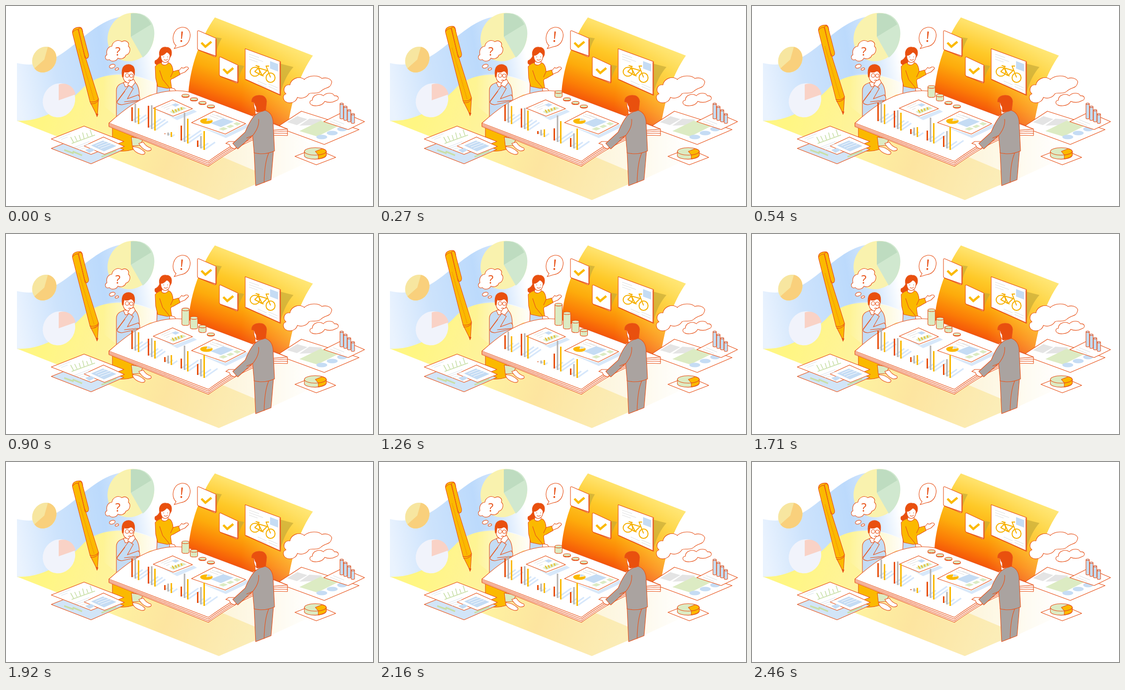
Recreate the animation shown at these times as an HTML page. Size 738 by 403 pixels, loop 2520 ms.

```html
<!DOCTYPE html>
<html lang="en">
<head>
<meta charset="utf-8">
<title>Open book workshop</title>
<style>
html, body { margin: 0; width: 100%; height: 100%; overflow: hidden; background: #fff; }
svg { display: block; width: 738px; height: 403px; }
.l { stroke: #e8531a; stroke-width: 1.1; stroke-linejoin: round; stroke-linecap: round; }
.n { fill: none; }
.w { fill: #fff; }
.y { fill: #fbb900; }
.b { fill: #c5dcf4; }
.g { fill: #dcebc3; }
.r { fill: #e9500e; }
.s { fill: #aaa3a0; }
.e { fill: #e4e4e4; }
.mark { fill: #e8531a; font: 500 24px "Noto Sans", "Open Sans", sans-serif; text-anchor: middle; }
</style>
</head>
<body>
<svg viewBox="0 0 738 403" xmlns="http://www.w3.org/2000/svg">
<defs>
  <linearGradient id="sky" gradientUnits="userSpaceOnUse" x1="22" y1="170" x2="300" y2="120">
    <stop offset="0" stop-color="#eaf3fe"/><stop offset=".3" stop-color="#cde3fc"/>
    <stop offset=".65" stop-color="#bcdafc"/><stop offset=".8" stop-color="#cfe4fd"/>
    <stop offset="1" stop-color="#fff"/>
  </linearGradient>
  <linearGradient id="floor" gradientUnits="userSpaceOnUse" x1="90" y1="190" x2="500" y2="340">
    <stop offset="0" stop-color="#fff683"/><stop offset=".35" stop-color="#fef2a0"/>
    <stop offset=".6" stop-color="#fde5a0"/><stop offset="1" stop-color="#fbedb8"/>
  </linearGradient>
  <linearGradient id="haze" gradientUnits="userSpaceOnUse" x1="440" y1="0" x2="625" y2="0">
    <stop offset="0" stop-color="#fdf5dc"/><stop offset="1" stop-color="#fff"/>
  </linearGradient>
  <linearGradient id="mist" gradientUnits="userSpaceOnUse" x1="195" y1="0" x2="310" y2="0">
    <stop offset="0" stop-color="#fff" stop-opacity="0"/><stop offset="1" stop-color="#fff"/>
  </linearGradient>
  <linearGradient id="page" gradientUnits="userSpaceOnUse" x1="463" y1="212" x2="516" y2="62">
    <stop offset="0" stop-color="#f4520a"/><stop offset=".18" stop-color="#fb7d06"/>
    <stop offset=".42" stop-color="#fdac0c"/><stop offset=".7" stop-color="#fec928"/>
    <stop offset="1" stop-color="#ffe26a"/>
  </linearGradient>
  <linearGradient id="glow" gradientUnits="userSpaceOnUse" x1="480" y1="100" x2="610" y2="110">
    <stop offset="0" stop-color="#fff08c" stop-opacity="0"/><stop offset="1" stop-color="#fff08c" stop-opacity=".4"/>
  </linearGradient>
</defs>

<!-- backdrop -->
<path fill="url(#sky)" d="M22 115C80 128 115 95 150 67C190 34 215 20 250 20C275 20 292 32 304 52V190H140L80 236L22 232Z"/>
<path fill="url(#floor)" d="M22 231C80 234 122 198 152 168C185 130 255 130 310 160L545 250L540 343L428 391Z"/>
<path fill="url(#mist)" d="M195 139C235 132 275 140 310 160H370L330 180L290 178L222 222L195 200Z"/>
<path fill="url(#haze)" d="M408 290L566 245L640 300L537 347L430 302Z"/>
<g transform="translate(77 108) rotate(32)">
  <ellipse rx="23.5" ry="27" fill="#f7e6a0"/>
  <path fill="#f9d07c" d="M0 0L-7.500 -25.600A23.5 27 0 1 1 -7.500 25.600Z"/>
</g>
<ellipse cx="106.500" cy="190" rx="32" ry="35" transform="rotate(28 106.500 190)" fill="#f1f3fb"/>
<path fill="#f9d2c6" d="M106 190V158C121 153 136 161 140 178Z"/>
<g>
  <ellipse cx="251" cy="62.500" rx="45.500" ry="50" transform="rotate(32 251 62.500)" fill="#f9f2ae"/>
  <path fill="#d0e8cf" d="M251 62V15C282 10 301 33 298 60C296 80 287 95 275 104Z"/>
  <path fill="#bedcc0" d="M251 62V15C271 13 285 22 292 37Z"/>
</g>

<!-- pen -->
<g id="pen" class="l">
  <path class="y" d="M169 193L182 219L184 219L186 187Z"/>
  <path class="r" d="M181 217L183 223L185 218Z"/>
  <path class="y" d="M134 56C132 47 139 42 150 43Q153 44 154 50L160 104L186 187Q182 195 169 193Z"/>
  <path class="y" d="M145 47Q150 41 153 48L166 98Q167 105 161 106L158 99Z"/>
  <path class="n" d="M134 53Q140 46 146 48L159 105M170 197Q181 198 186 190"/>
  <path class="n" stroke-dasharray=".3 2.800" d="M147 87L177 189"/>
</g>

<!-- seated thinker -->
<g class="l">
  <path class="y" d="M214 240V289Q234 296 256 289V262Z"/>
  <path class="g" d="M252 264L276 268L269 281L254 282Z"/>
  <path class="w" d="M254 284Q266 282 279 294Q281 300 272 299Q257 295 254 284ZM267 277L276 274Q281 283 291 286Q295 292 284 292Q274 289 267 277Z"/>
  <path class="b" d="M222 228V170Q222 159 235 155L258 153Q267 158 268 178L269 228Z"/>
  <path class="w" d="M236 154L240 163L252 160L250 151Z"/>
  <path class="w" d="M234 134L235 143Q238 155 247 155Q257 151 258 136L254 127L239 128Z"/>
  <path class="r" d="M234 143Q231 125 239 120Q248 115 256 122Q260 128 258 139Q256 132 251 131Q242 136 238 132Q236 137 236 143Z"/>
  <path class="w" d="M245 158L249 151L257 148L260 154L254 162L247 167Z"/>
  <path class="b" d="M247 160L256 166L244 187L266 179Q271 184 268 191L233 199Q221 198 224 191Z"/>
  <path class="n" d="M224 192L239 172M238 193L267 190"/>
  <g class="n"><circle cx="243.500" cy="140" r="3.700" class="w"/><circle cx="252" cy="140.500" r="3.500" class="w"/><path d="M246 150Q249 148 251 150"/></g>
</g>
<g class="l w">
  <path d="M203 98C201 89 205 82 213 81C214 72 225 66 233 72C241 67 249 74 246 81C252 86 249 97 241 99C239 106 230 108 225 105C222 112 212 113 208 108C200 111 197 102 203 98Z"/>
  <ellipse cx="213.500" cy="121.500" rx="6" ry="3.700" transform="rotate(-18 213 121)"/>
  <ellipse cx="223" cy="127" rx="3.700" ry="2" transform="rotate(-18 223 127)"/>
</g>
<text class="mark" x="225" y="100">?</text>

<!-- standing woman -->
<g class="l">
  <path class="r" d="M309 101C306 88 314 82 322 83C331 83 335 91 332 100L322 116Q311 113 305 119Q297 117 300 110Q306 108 309 101Z"/>
  <path class="w" d="M304 158L330 160L342 180L304 182Z"/>
  <path class="b" d="M304 157L331 161L333 178L303 182Z"/>
  <path class="w" d="M347 131L353 124Q357 127 361 123Q367 122 367 126L360 133L348 138Z"/>
  <path class="w" d="M329 164L339 167L342 172L329 174Z"/>
  <path class="y" d="M300 122Q306 114 316 114L329 115Q335 119 336 132L347 129L350 138L336 146Q331 147 331 151L333 165L324 166L305 162L301 145Z"/>
  <path class="w" d="M313 112V117Q320 122 326 115V111Z"/>
  <path class="w" d="M311 100Q312 113 320 114Q329 113 330 100Q328 94 323 93Q317 100 311 100Z"/>
  <path class="n" d="M318 108Q322 111 325 107M309 130L315 148L328 164M336 132L331 143"/>
  <path d="M317 102V103M325 102V103"/>
</g>
<path class="l w" d="M342 80C331 70 335 47 352 43C368 41 373 55 369 67C366 77 359 81 351 82L338 86Z"/>
<text class="mark" x="353" y="72" transform="rotate(5 353 64)" style="font-size:29px">!</text>

<!-- raised page -->
<g>
  <path fill="url(#page)" d="M420 23L617 100C591 137 575 185 566 248L367 173C371 120 391 64 420 23Z"/>
  <path fill="url(#glow)" d="M420 23L617 100C591 137 575 185 566 248L367 173C371 120 391 64 420 23Z"/>
  <g fill="#c5a938" opacity=".65">
    <path d="M421 63L434 65Q426 78 423 94ZM466 118L479 121Q471 133 467 149ZM551 116L578 123Q561 142 552 175Z"/>
  </g>
  <g class="l w">
    <path d="M388 50L420 64Q423 65 423 68V99Q423 103 419 102L388 89Q385 88 385 85V52Q385 49 388 50Z"/>
    <path d="M432 103L464 118Q467 119 467 122V152Q467 156 463 155L432 142Q429 141 429 138V105Q429 102 432 103Z"/>
    <path d="M481 86L552 112V180L481 148Z"/>
    <path class="n" stroke-width="1.600" d="M422 67V101L388 89M466 121V154L432 142M551 113V179L482 148"/>
  </g>
  <g fill="none" stroke="#fbb900" stroke-width="4.500"><path d="M393 74L401 82L413 72M437 127L445 135L457 125"/></g>
  <path class="b" d="M531 111L547 117V132L531 126Z"/>
  <g stroke="#dedede" fill="none"><path d="M489 97L509 104M489 102L517 112M489 107L506 113M506 151L524 159M528 157L546 165M506 156L524 164M528 162L546 170"/></g>
  <g fill="none" stroke="#f6b000" stroke-width="2" stroke-linejoin="round">
    <ellipse cx="500.500" cy="132.500" rx="9.500" ry="9"/>
    <ellipse cx="532" cy="144.500" rx="9" ry="9.500"/>
    <path d="M500 132L508 125L525 130L515 140L500 132M515 140L506 121M502 120L510 122M532 144L523 121L529 121M512 139L518 141"/>
  </g>
</g>

<!-- clouds -->
<g class="l w">
  <path d="M563 177C554 168 562 157 571 159C573 146 590 140 600 148C609 139 629 139 635 146C648 142 658 150 654 157C652 166 641 164 634 171C627 179 613 173 609 177C604 186 592 187 586 184C582 199 560 198 558 186C557 181 560 178 563 177Z"/>
  <path d="M616 190C616 178 633 175 638 181C645 173 659 175 660 181C670 180 671 189 663 191C656 195 647 195 641 192C636 203 613 204 611 195Q611 190 616 190Z"/>
</g>

<!-- loose papers, left -->
<g class="l">
  <path fill="#d2e5f8" d="M91 287L157 261L237 289L171 318Z"/>
  <path class="w" d="M91 268L157 242L237 273L171 299Z"/>
  <path class="w" d="M157 282L196 264L238 283L198 299Z"/>
</g>
<path class="b" d="M159 290L171 286L179 290L168 296ZM171 281L195 271L222 282L197 293Z"/>
<path fill="none" stroke="#fff" d="M180 281L200 273M185 284L207 276M190 287L212 279"/>
<g fill="none" stroke="#c9dfa8" stroke-width="1.600"><path d="M136 275L130 264M143 272L138 262M150 270L147 260M157 267L154 255M165 264L162 256M173 261L169 249M132 277L179 260"/></g>
<g fill="none" stroke="#d9e4ee"><path d="M106 267L130 257M111 269L124 264M137 285L168 273M142 287L166 278M147 290L161 285"/></g>
<path fill="none" stroke="#c9dfa8" stroke-width="3" d="M117 290L136 297M134 293L153 301M192 304L222 292"/>

<!-- loose papers, right -->
<path class="l w" d="M545 244L594 212L710 249L640 279Z"/>
<path class="e" d="M565 234L586 222L606 228L585 240ZM590 241L610 227L637 229L618 240Z"/>
<path class="g" d="M590 252L633 231L668 242L626 263Z"/>
<g class="b"><ellipse cx="635" cy="264" rx="11" ry="4.500"/><ellipse cx="656" cy="256" rx="11" ry="4.500"/><ellipse cx="676" cy="248" rx="10" ry="4.500"/></g>
<path class="l w" d="M639 233L677 214L721 233L688 249Z"/>
<path fill="none" stroke="#dedede" d="M652 232L674 241M658 229L680 238"/>
<g id="posts" class="l"></g>
<path class="l w" d="M581 303L622 287L663 305L624 320Z"/>
<g class="l">
  <path class="g" d="M600 293V302C603 311 641 311 644 301V293Z"/>
  <path class="y" d="M628 300V308Q641 306 644 301V293Z"/>
  <ellipse class="g" cx="622" cy="293" rx="22" ry="7.500"/>
  <path class="y" d="M622 293L636 287.500Q644 290 644 293Q643 298 628 300Z"/>
</g>

<!-- book -->
<g class="l w">
  <path d="M207 236V243L407 323C440 300 470 280 510 264Q535 259 566 261V248L500 220Z"/>
  <path d="M207 236C235 211 270 182 312 174Q342 168 367 173L566 248Q530 250 508 256C465 272 440 290 407 313Z"/>
  <path class="n" d="M207 238.500L407 316.500C440 293 470 274 510 258.500Q535 252 566 252M207 241L407 320C440 297 470 277 510 261Q535 255 566 256.500"/>
</g>
<path fill="#d8e8fa" d="M309 211L338 224L377 209L384 213L344 230ZM389 243L441 260L484 238L492 242L442 266Z"/>
<g class="l w"><path d="M296 206L335 189L375 207L336 222ZM373 235L418 212L482 237L441 258Z"/></g>
<path fill="none" stroke="#dedede" d="M312 204L330 196M317 206L335 199M322 209L329 206M410 221L427 227M414 218L434 225M423 220L438 226"/>
<path class="b" d="M333 199L341 196L349 199L341 203ZM411 236L437 226L458 233L432 244Z"/>
<path class="g" d="M329 213L355 203L363 206L337 217ZM428 248L437 244L446 247L437 251ZM443 243L452 239L459 242L450 246ZM457 237L464 234L473 237L465 241Z"/>
<path fill="none" stroke="#e9b91c" stroke-width="2" d="M334 209L338 215M340 208L343 213M346 206L348 211M352 204L354 209"/>
<ellipse class="y" cx="403" cy="232" rx="12.500" ry="5.500"/>
<path class="w" d="M403 232L405 226L415 230Z"/>
<path class="b" d="M404 231L406 226L414 229Z"/>

<g id="shade" stroke="#d6e7fb" stroke-width="3"></g>
<g id="bars"></g>
<g id="drums" class="l"></g>

<!-- presenter -->
<g class="l">
  <path class="s" d="M499 294L502 362L533 350L538 290Z"/>
  <path class="n" d="M528 297Q520 315 519 356"/>
  <path class="w" d="M459 273L448 273L442 277L449 279L452 285L460 288L466 281Z"/>
  <path class="w" d="M501 206V218L519 215V203Z"/>
  <path class="s" d="M503 218Q510 213 520 210Q535 214 537 232L540 292Q520 301 499 296L496 261L466 288L456 277L481 254Q492 227 503 218Z"/>
  <path class="n" d="M508 228Q510 244 496 261M496 261L484 266"/>
  <path class="w" d="M498 196Q499 211 506 214L514 205L510 189Z"/>
  <path class="r" d="M494 193Q494 181 508 180Q522 179 524 192L522 210Q513 214 504 213L503 203Q499 198 500 194Z"/>
</g>
</svg>
<script>
const LOOP = 2520, STEP = 60;
const $ = id => document.getElementById(id);

function add(parent, tag, attrs) {
  const el = document.createElementNS('http://www.w3.org/2000/svg', tag);
  for (const k in attrs) el.setAttribute(k, attrs[k]);
  parent.appendChild(el);
  return el;
}

const drum = (x, y, h, rx, ry) =>
  `M${x - rx} ${y - h}V${y}A${rx} ${ry} 0 0 0 ${x + rx} ${y}V${y - h}` +
  `A${rx} ${ry} 0 0 0 ${x - rx} ${y - h}A${rx} ${ry} 0 0 0 ${x + rx} ${y - h}`;

// fixed blue posts
[29, 26, 22, 17].forEach((h, i) =>
  add($('posts'), 'path', { class: 'b', d: drum(675 + 7.5 * i, 226 + 3 * i, h, 3.4, 1.5) }));

// low and high bar heights, three bars per group
const groups = [
  { from: [28, 38, 32], to: [37, 46, 40] },
  { from: [44, 48, 46], to: [34, 38, 36] },
  { from: [1, 6, 10], to: [10, 16, 20] },
  { from: [30, 59, 50], to: [20, 49, 41] },
  { from: [13, 25, 38], to: [22, 35, 47] }
];
const colors = ['#e9500e', '#b5b3b2', '#fbb900'];
const bars = groups.flatMap(({ from, to }, g) => from.map((a, k) => ({
  a, b: to[k], x: 253.5 + 33 * g + 6.5 * k, y: 232 + 13 * g + 3 * k,
  shade: add($('shade'), 'line', {}),
  el: add($('bars'), 'rect', { width: 3, fill: colors[k] })
})));

const drums = [0, 1, 2, 3].map(() => add($('drums'), 'path', { class: 'g' }));

// shared rise and fall of pen and drums
const rise = [[0, 0], [540, .46], [900, .74], [1200, 1], [1260, .98], [1710, .68], [2160, .28], [LOOP, 0]];
function lift(t) {
  const i = rise.findIndex(([at]) => at > t);
  const [t0, v0] = rise[i - 1], [t1, v1] = rise[i];
  return v0 + (v1 - v0) * (t - t0) / (t1 - t0);
}

const ease = x => {
  x = Math.min(1, Math.max(0, x));
  return x * x * (3 - 2 * x);
};

function draw(t) {
  const up = lift(t);
  $('pen').setAttribute('transform', `translate(0 ${-10 * up})`);

  drums.forEach((el, i) => {
    const h = Math.max(1, 40 * up - 10 * i);
    el.setAttribute('d', drum(361 + 17 * i, 181.5 + 7.2 * i, h, 7.4, 2.8));
  });

  const beat = t % (LOOP / 2);
  const mix = ease(beat / 450) - ease((beat - 900) / 340);
  for (const { a, b, x, y, el, shade } of bars) {
    const h = a + (b - a) * mix;
    el.setAttribute('x', x - 1.5);
    el.setAttribute('y', y - h);
    el.setAttribute('height', h);
    const s = { x1: x + 1, y1: y - 1, x2: x + 1 + h * .55, y2: y - 1 - h * .38 };
    for (const k in s) shade.setAttribute(k, s[k]);
  }
}

const start = performance.now();
function tick() {
  const t = (performance.now() - start) % LOOP;
  draw(Math.floor(t / STEP) * STEP);
  requestAnimationFrame(tick);
}
draw(0);
requestAnimationFrame(tick);
</script>
</body>
</html>
```
